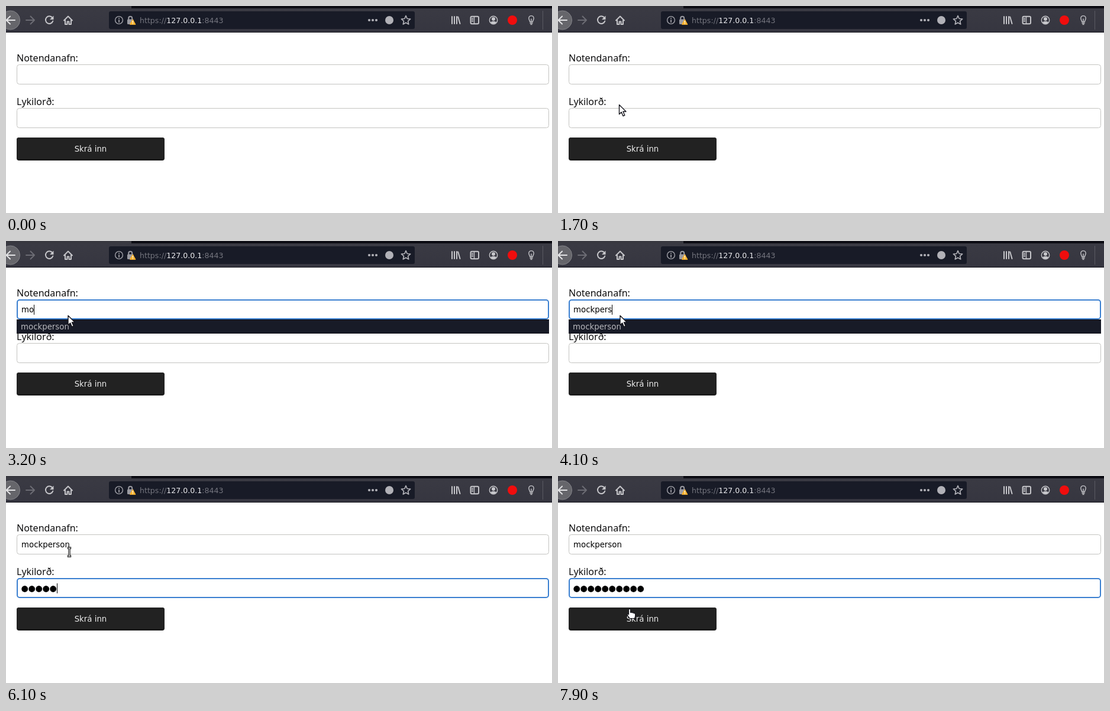
Recreate the animation shown at these times as an HTML page. Size 923x351 px, loop 8000 ms.

```html
<!DOCTYPE html>
<html lang="is">
<head>
<meta charset="utf-8">
<title>Skrá inn</title>
<style>
html, body { margin: 0; width: 100%; height: 100%; overflow: hidden; background: #fff; }
svg { display: block; }
text { font: 13.333px "DejaVu Sans", sans-serif; white-space: pre; }
.label { font: 16px "Noto Sans", "Open Sans", sans-serif; fill: #0c0c0d; }
.url { font-size: 12.6px; fill: #74757e; }
.line { fill: none; stroke: #c6c6ca; stroke-width: 2; stroke-linecap: round; stroke-linejoin: round; }
.thin { stroke-width: 1.4; }
.field { fill: #fff; }
</style>
</head>
<body>
<svg width="923" height="351" viewBox="0 0 923 351">
  <defs>
    <linearGradient id="bar" x2="0" y2="1">
      <stop stop-color="#3a3a43"/><stop offset="1" stop-color="#363640"/>
    </linearGradient>
  </defs>

  <!-- Browser toolbar -->
  <rect width="923" height="45" fill="#0c0c13"/>
  <rect width="212" height="5" fill="#38383f"/>
  <rect y="4" width="923" height="40" fill="url(#bar)"/>
  <circle cx="7.5" cy="24" r="16" fill="#66666b" stroke="#85858a"/>
  <path class="line" style="stroke:#e4e4e6" d="M15 24H1M7 17.5L.5 24L7 30.5"/>
  <path class="line" style="stroke:#6c6c74" d="M34 24H48M41.5 17.5L48 24L41.5 30.5"/>
  <path class="line" d="M78.4 20A6.3 6.3 0 1 0 79.3 25.5"/>
  <path d="M80.5 16.5V23H74Z" fill="#c6c6ca"/>
  <path class="line" d="M98 24.5L105 17.5L112 24.5M100 24V31H103.5V26.5H106.5V31H110V24"/>

  <rect x="174" y="9" width="517" height="30" rx="3" fill="#181b27"/>
  <circle class="line thin" cx="191" cy="24" r="6.4" style="stroke:#a3a3aa"/>
  <path d="M190.2 20h1.7v1.8h-1.7zM190.2 23h1.7v5h-1.7z" fill="#a3a3aa"/>
  <path class="line" d="M207.2 23V20.7A3 3 0 0 1 213.2 20.7V23" style="stroke:#9a9aa1"/>
  <rect x="205" y="22.5" width="10.5" height="8.5" rx="1.5" fill="#9a9aa1"/>
  <path d="M214.3 22.8L219 31.3H209.5Z" fill="#ffb42e" stroke="#ffb42e" stroke-linejoin="round"/>
  <path d="M213.7 25.3h1.3v3h-1.3zM213.7 29.2h1.3v1.3h-1.3z" fill="#fff"/>
  <text class="url" x="226" y="28.5">https://<tspan fill="#e9e9ed">127.0.0.1</tspan>:8443</text>
  <g fill="#b1b1b7">
    <circle cx="614" cy="24" r="2.1"/><circle cx="620" cy="24" r="2.1"/><circle cx="626" cy="24" r="2.1"/>
    <circle cx="648" cy="24" r="7"/>
  </g>
  <path id="star" class="line" style="stroke:#b1b1b7;stroke-width:1.7"/>

  <path class="line" d="M754 18V30M758 18V30M762 18V30M764.2 18.5L767.5 30"/>
  <rect class="line" x="785.5" y="17.8" width="13.5" height="12.4" rx="2"/>
  <path class="line thin" d="M791.5 18V30M787.5 21H789.5M787.5 23.5H789.5M787.5 26H789.5"/>
  <circle class="line thin" cx="824" cy="24" r="6.7"/>
  <circle cx="824" cy="22" r="3" fill="#c6c6ca"/>
  <path d="M819 28C820.5 25 827.5 25 829 28A6.5 6.5 0 0 1 819 28Z" fill="#c6c6ca"/>
  <circle cx="856" cy="24" r="8" fill="#f00d0d"/>
  <path class="line thin" d="M885.7 27C885.7 25 883.8 23.5 883.8 20.8A4.2 4.2 0 0 1 892.2 20.8C892.2 23.5 890.3 25 890.3 27ZM886 29.2H890M887 31.2H889M888 26V22"/>
  <path d="M907.5 8V40" stroke="#5b5b63"/>

  <!-- Login form -->
  <text class="label" x="18" y="94">Notendanafn:</text>
  <text class="label" x="18" y="168">Lykilorð:</text>
  <rect id="userBox" class="field"/>
  <rect id="passBox" class="field"/>
  <text id="user" x="26" y="121"></text>
  <g id="dots"></g>
  <rect id="caret" width="1" height="17"/>
  <rect x="18" y="223" width="250" height="39" rx="4" fill="#1b1b1b"/>
  <rect x="18" y="223" width="250" height="36" rx="4" fill="#222"/>
  <text x="143" y="247" text-anchor="middle" fill="#eee">Skrá inn</text>
  <g id="popup">
    <rect x="18" y="133" width="900" height="24" fill="#181b27"/>
    <path d="M18 133.5H918M18 156.5H918" stroke="#0c0c13"/>
    <text id="hint" x="25" y="150" fill="#b8b8bd"></text>
  </g>

  <!-- Pointers, hotspot at 0,0 -->
  <g id="pointer">
    <path id="arrow" d="M.5 .5V16.5L4.2 13L7 19.5L9.8 18.3L7 12H12Z" fill="#fff" stroke="#15151c" stroke-width="1.4" stroke-linejoin="round"/>
    <g id="beam" fill="none">
      <path d="M-3.2 -7H3.2M-3.2 7H3.2M0 -7V7" stroke="#111" stroke-width="3.4"/>
      <path d="M-2.5 -7H2.5M-2.5 7H2.5M0 -7V7" stroke="#fff" stroke-width="1.2"/>
    </g>
    <path id="hand" d="M-1.5 0.5C-1.5 -1 1.5 -1 1.5 .5V5.5C3 4.7 4 5 4.3 6C5.5 5.3 6.7 5.7 7 6.8C8.5 6.3 9.7 7 9.7 8.5V11C9.7 13 8.7 13.5 8.7 15.5H0C-.5 13.5 -3.8 11 -3.8 9C-3.8 7.6 -2.3 7.7 -1.5 9Z" fill="#fff" stroke="#15151c" stroke-width="1.2" stroke-linejoin="round"/>
  </g>
</svg>
<script>
const LOOP = 8000, STEP = 100, BLINK = 500;
const NAME = 'mockperson';
const FOCUS_USER = 2300, FOCUS_PASS = 4700;
const nameKeys = [2900, 3100, 3300, 3500, 3600, 3800, 3900, 4100, 4200, 4400];
const passKeys = [5400, 5600, 5700, 5900, 6000, 6200, 6200, 6300, 6300, 6400];

// time, x, y, pointer shape
const path = [
  [1400, 150, 372, 'arrow'], [1500, 140, 350, 'arrow'], [1600, 128, 337, 'arrow'],
  [1700, 103, 167, 'arrow'], [1800, 104, 145, 'arrow'], [1900, 106, 131, 'beam'],
  [2000, 107, 129, 'beam'], [2900, 104.5, 126, 'arrow'], [4400, 107, 129, 'beam'],
  [7200, 107, 129, 'beam'], [7300, 109, 145, 'beam'], [7400, 113, 180, 'beam'],
  [7500, 118, 212, 'arrow'], [7600, 121, 226, 'hand']
];

const el = id => document.getElementById(id);
const set = (id, attrs) => { for (const k in attrs) el(id).setAttribute(k, attrs[k]); };
const show = (id, on) => { el(id).style.display = on ? '' : 'none'; };
const typed = (keys, t) => keys.filter(k => k <= t).length;

const star = Array.from({ length: 10 }, (_, i) => {
  const r = i % 2 ? 3.7 : 8, a = i * Math.PI / 5 - Math.PI / 2;
  return [676 + r * Math.cos(a), 24.5 + r * Math.sin(a)];
});
set('star', { d: 'M' + star.join('L') + 'Z' });
el('dots').innerHTML = passKeys.map((_, i) =>
  `<circle cx="${31.7 + 12 * i}" cy="191.5" r="5.4"/>`).join('');
el('hint').textContent = NAME;

function drawField(id, y, focused) {
  const w = focused ? 2 : 1;
  set(id, {
    x: 18 + w / 2, y: y + w / 2, width: 900 - w, height: 34 - w, rx: 4,
    stroke: focused ? '#3a7fd0' : '#c3c3c0', 'stroke-width': w
  });
}

function drawCaret(t, nName, nPass) {
  const inPass = t >= FOCUS_PASS;
  const start = inPass ? FOCUS_PASS : FOCUS_USER;
  const keys = inPass ? passKeys : nameKeys;
  const last = Math.max(start, ...keys.filter(k => k <= t));
  show('caret', t >= start && Math.floor((t - last) / BLINK) % 2 === 0);
  const w = inPass ? 12 * nPass : nName ? el('user').getComputedTextLength() : 0;
  set('caret', { x: Math.round(26 + w), y: inPass ? 182 : 108 });
}

function drawPointer(t) {
  const now = path.filter(p => p[0] <= t).pop();
  show('pointer', now);
  if (!now) return;
  set('pointer', { transform: `translate(${now[1]} ${now[2]})` });
  for (const id of ['arrow', 'beam', 'hand']) show(id, id === now[3]);
}

function draw(t) {
  const nName = typed(nameKeys, t), nPass = typed(passKeys, t);
  drawField('userBox', 99, t >= FOCUS_USER && t < FOCUS_PASS);
  drawField('passBox', 173, t >= FOCUS_PASS);
  el('user').textContent = NAME.slice(0, nName);
  [...el('dots').children].forEach((dot, i) => { dot.style.display = i < nPass ? '' : 'none'; });
  show('popup', nName > 0 && nName < NAME.length);
  drawCaret(t, nName, nPass);
  drawPointer(t);
}

const begin = performance.now();
function tick() {
  const t = (performance.now() - begin) % LOOP;
  draw(Math.floor(t / STEP) * STEP);
  requestAnimationFrame(tick);
}
tick();
</script>
</body>
</html>
```
